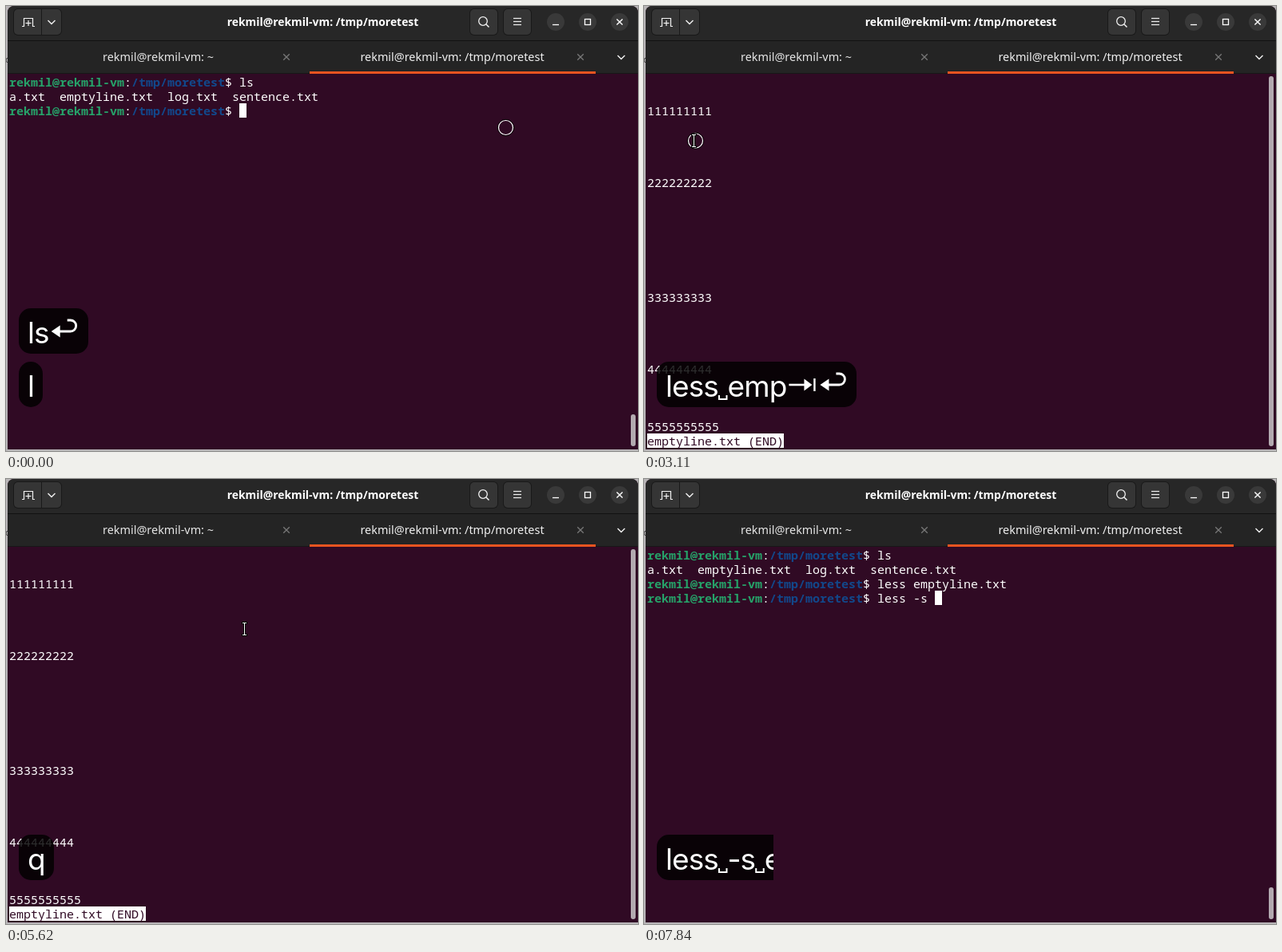
Write an HTML page with a canvas that moves like this. It is 791x558 px and loops after 7.99 s.

```html
<!DOCTYPE html>
<html lang="en">
<head>
<meta charset="utf-8">
<title>Terminal demo</title>
<style>
  html, body { margin: 0; width: 100%; height: 100%; overflow: hidden; background: #300a24; }
  canvas { display: block; width: 791px; height: 558px; }
</style>
</head>
<body>
<canvas id="stage" width="791" height="558"></canvas>
<script>
const ctx = document.getElementById("stage").getContext("2d");
const LOOP = 7990, STEP = LOOP / 54;
const CELL = 9, ROW = 18, LEFT = 4, TOP = 86;
const MONO = '15px "Noto Sans Mono", "DejaVu Sans Mono", monospace';
const UI = '"Noto Sans", "Open Sans", sans-serif';
const KEY_FONT = '37px Inter, Roboto, sans-serif';
const HOST = "rekmil@rekmil-vm", DIR = "/tmp/moretest";
const LAG = 120;       // delay between a key and its echo
const RESIZE = 20;     // delay before a key label grows

const first = { keys: "less emp\t\n", at: [-30, 100, 250, 400, 700, 1060, 1290, 1440, 1640, 2190] };
const second = { keys: "less -s e", at: [6340, 6480, 6630, 6780, 6930, 7080, 7220, 7520, 7830] };
const pagerOpen = 2210, pagerClose = 5700, quitKey = 5580;
const path = [[2600, 250, 176], [2950, 64, 169], [3560, 64, 169], [3690, 76, 187],
  [4900, 76, 187], [5030, 244, 184], [5170, 262, 182], [5320, 300, 188]];

const within = (t, a, b) => t >= a && t < b;
const typed = (cmd, t) => cmd.keys.slice(0, cmd.at.filter(k => k <= t).length);
const fade = (t, start) => Math.max(0, Math.min(1, 1 - (t - start) / 180));

function box(x, y, w, h, color, r = 0) {
  ctx.fillStyle = color;
  ctx.beginPath();
  ctx.roundRect(x, y, w, h, r);
  ctx.fill();
}

function line(points, color, width = 1) {
  ctx.strokeStyle = color;
  ctx.lineWidth = width;
  ctx.beginPath();
  points.forEach(([x, y], i) => i ? ctx.lineTo(x, y) : ctx.moveTo(x, y));
  ctx.stroke();
}

function ring(x, y, r, color, width = 1) {
  ctx.strokeStyle = color;
  ctx.lineWidth = width;
  ctx.beginPath();
  ctx.arc(x, y, r, 0, Math.PI * 2);
  ctx.stroke();
}

function label(text, x, y, font, color) {
  ctx.font = font;
  ctx.fillStyle = color;
  ctx.textAlign = "center";
  ctx.fillText(text, x, y);
  ctx.textAlign = "left";
}

function button(x, w) {
  box(x, 3, w, 34, "#191919", 6);
  box(x + 1, 4, w - 2, 32, "#353535", 5);
}

function cross(x, y, r, color, width) {
  line([[x - r, y - r], [x + r, y + r]], color, width);
  line([[x + r, y - r], [x - r, y + r]], color, width);
}

function chevron(x, y) {
  line([[x - 4.5, y - 2], [x, y + 2.5], [x + 4.5, y - 2]], "#f2f2f2", 1.4);
}

function drawWindow() {
  box(0, 0, 791, 558, "#b8b5b7");
  ctx.strokeStyle = "#333";
  ctx.lineWidth = 1;
  ctx.beginPath();
  ctx.arc(3, 68, 3, 1.8, 4.5);
  ctx.stroke();
  box(2, 0, 789, 556, "#300a24", [8, 8, 0, 0]);
  box(2, 0, 789, 44, "#272727", [8, 8, 0, 0]);
  box(2, 43, 789, 1, "#121212");
  box(2, 44, 789, 41, "#242424");
  box(2, 84, 789, 1, "#171717");
  box(380, 82, 358, 3, "#e95420");

  button(9, 61);
  box(44, 4, 1, 32, "#191919");
  line([[20, 25.5], [22.5, 25.5], [22.5, 15.5], [33.5, 15.5], [33.5, 25.5], [36, 25.5]], "#f2f2f2", 1.2);
  line([[28, 18], [28, 25]], "#f2f2f2", 1.2);
  line([[24.5, 21.5], [31.5, 21.5]], "#f2f2f2", 1.2);
  chevron(57, 20);

  button(580, 36);
  ring(597, 19, 5.3, "#f2f2f2", 1.3);
  line([[601, 23], [604.5, 26.5]], "#f2f2f2", 1.5);
  button(622, 36);
  for (const y of [15.5, 19.5, 23.5]) line([[635, y], [645, y]], "#f2f2f2", 1.2);

  for (const x of [688, 728, 768]) box(x - 11, 9, 22, 22, "#393939", 11);
  line([[684, 23.5], [692, 23.5]], "#fff", 1.3);
  ctx.strokeRect(724.5, 16.5, 7, 7);
  cross(768, 20, 3.6, "#fff", 1.4);

  const title = HOST + ": " + DIR;
  label(title, 396.5, 25, "bold 13.9px " + UI, "#fff");
  label(HOST + ": ~", 190.5, 69, "14.4px " + UI, "#e6e6e6");
  label(title, 558.5, 69, "14.4px " + UI, "#f0f0f0");
  cross(351, 64, 3.8, "#777", 1.3);
  cross(719, 64, 3.8, "#777", 1.3);
  chevron(770, 64);
}

function cellText(text, col, row, color = "#fff", bold = false) {
  ctx.font = (bold ? "bold " : "") + MONO;
  ctx.fillStyle = color;
  ctx.fillText(text, LEFT + col * CELL, TOP + row * ROW + 15);
}

function cells(col, row, n) {
  box(LEFT + col * CELL, TOP + row * ROW, n * CELL, ROW, "#fff");
}

function prompt(row, cmd) {
  const colon = HOST.length, end = colon + 1 + DIR.length;
  cellText(HOST, 0, row, "#26a269", true);
  cellText(":", colon, row);
  cellText(DIR, colon + 1, row, "#12488b", true);
  cellText("$ " + cmd, end, row);
  return end + 2 + cmd.length;
}

function drawShell(t) {
  prompt(0, "ls");
  cellText("a.txt  emptyline.txt  log.txt  sentence.txt", 0, 1);
  let row = 2, cmd = typed(first, t - LAG);
  if (t >= pagerClose) {
    prompt(row++, "less emptyline.txt");
    cmd = typed(second, t - LAG);
  }
  const col = prompt(row, cmd.replace("\t", "tyline.txt "));
  cells(col, row, 1);
  box(782, 512, 6, 40, "#b3aab0", 3);
}

function drawPager(t) {
  [2, 7, 15, 20, 24].forEach((row, i) => cellText(String(i + 1).repeat(i < 4 ? 9 : 10), 0, row));
  if (within(t, 3200, 3790)) cells(0, 4, 86);
  if (within(t, 3930, 5150)) cells(0, 5, 86);
  const status = "emptyline.txt (END)";
  const blink = Math.floor((t - 2185) / 600) % 2 === 0;
  cells(0, 25, status.length + (blink ? 1 : 0));
  cellText(status, 0, 25, "#300a24");
  box(782, 88, 6, 464, "#b3aab0", 3);
}

function clickRing(x, y) {
  ring(x, y, 10.1, "#000");
  ring(x, y, 9, "#fff", 1.2);
}

function drawPointer(t) {
  if (t < 100) clickRing(625.5, 152.5);
  if (!within(t, path[0][0], pagerClose)) return;
  let i = path.findIndex(p => p[0] > t);
  if (i < 0) i = path.length - 1;
  const [t0, x0, y0] = path[i - 1], [t1, x1, y1] = path[i];
  const k = Math.min(1, (t - t0) / (t1 - t0)), e = k * k * (3 - 2 * k);
  const x = Math.round(x0 + (x1 - x0) * e), y = Math.round(y0 + (y1 - y0) * e);
  const down = within(t, 3050, 3500) || within(t, 3780, 4250) || within(t, 5120, 5300);
  if (down) clickRing(x + 0.5, y);
  for (const [color, w] of [["#000", 3], ["#fff", 1]]) {
    const p = w / 2 - 0.5;
    line([[x - 1.5, y - 7], [x - 1.5, y + 7]], color, w);
    for (const s of [-7.5, 7.5]) line([[x - 4 - p, y + s], [x + 1 + p, y + s]], color, w);
  }
}

// Special keys: each draws itself at x around the middle line y.
const symbols = {
  " ": { w: 11.5, draw(x, y) {
    line([[x + 1, y + 13], [x + 1, y + 18], [x + 10.5, y + 18], [x + 10.5, y + 13]], "#fff", 2);
  } },
  "\t": { w: 39, draw(x, y) {
    line([[x + 3, y], [x + 25, y]], "#fff", 2.6);
    head(x + 32, y, -10);
    line([[x + 35, y - 8], [x + 35, y + 8]], "#fff", 2.4);
  } },
  "\n": { w: 38, draw(x, y) {
    ctx.lineWidth = 2.8;
    ctx.strokeStyle = "#fff";
    ctx.beginPath();
    ctx.moveTo(x + 10, y);
    ctx.lineTo(x + 27, y);
    ctx.arc(x + 27, y - 7, 7, Math.PI / 2, -Math.PI / 2, true);
    ctx.lineTo(x + 23, y - 14);
    ctx.stroke();
    head(x + 3, y, 11);
  } }
};

function head(x, y, len) {
  ctx.fillStyle = "#fff";
  ctx.beginPath();
  ctx.moveTo(x, y);
  ctx.lineTo(x + len, y - 7.5);
  ctx.lineTo(x + len, y + 7.5);
  ctx.fill();
}

function keyFont() {
  ctx.font = KEY_FONT;
  ctx.letterSpacing = "-0.9px";
}

function keyWidth(keys) {
  keyFont();
  return [...keys].reduce((w, k) => w + (symbols[k] ? symbols[k].w : ctx.measureText(k).width), 22);
}

function drawKeys(keys, y, alpha = 1, shown = keys) {
  if (!keys || alpha <= 0) return;
  ctx.save();
  ctx.beginPath();
  ctx.rect(16, y, Math.round(keyWidth(shown)), 57);
  ctx.clip();
  ctx.globalAlpha = alpha;
  box(16, y, Math.round(keyWidth(keys)), 57, "rgba(0,0,0,0.82)", 15);
  let x = 27;
  keyFont();
  for (const k of keys) {
    if (symbols[k]) {
      symbols[k].draw(x, y + 29);
      x += symbols[k].w;
    } else {
      ctx.fillStyle = "#fff";
      ctx.fillText(k, x, y + 44);
      x += ctx.measureText(k).width;
    }
  }
  ctx.restore();
}

function drawOverlay(t) {
  const upper = 379, lower = 446;
  if (t < quitKey) {
    drawKeys("ls\n", upper, fade(t, 1050));
    drawKeys(typed(first, t), lower, fade(t, 4040));
    return;
  }
  const keys = typed(second, t);
  drawKeys("q", keys ? upper : lower, fade(t, 7300));
  drawKeys(keys, lower, 1, typed(second, t - RESIZE));
}

function render(now) {
  const t = Math.floor(((now % LOOP) + 10) / STEP) % 54 * STEP;
  drawWindow();
  if (within(t, pagerOpen, pagerClose)) drawPager(t);
  else drawShell(t);
  drawOverlay(t);
  drawPointer(t);
}

let start;
function tick(now) {
  start ??= now;
  render(now - start);
  requestAnimationFrame(tick);
}
render(0);
requestAnimationFrame(tick);
</script>
</body>
</html>
```
